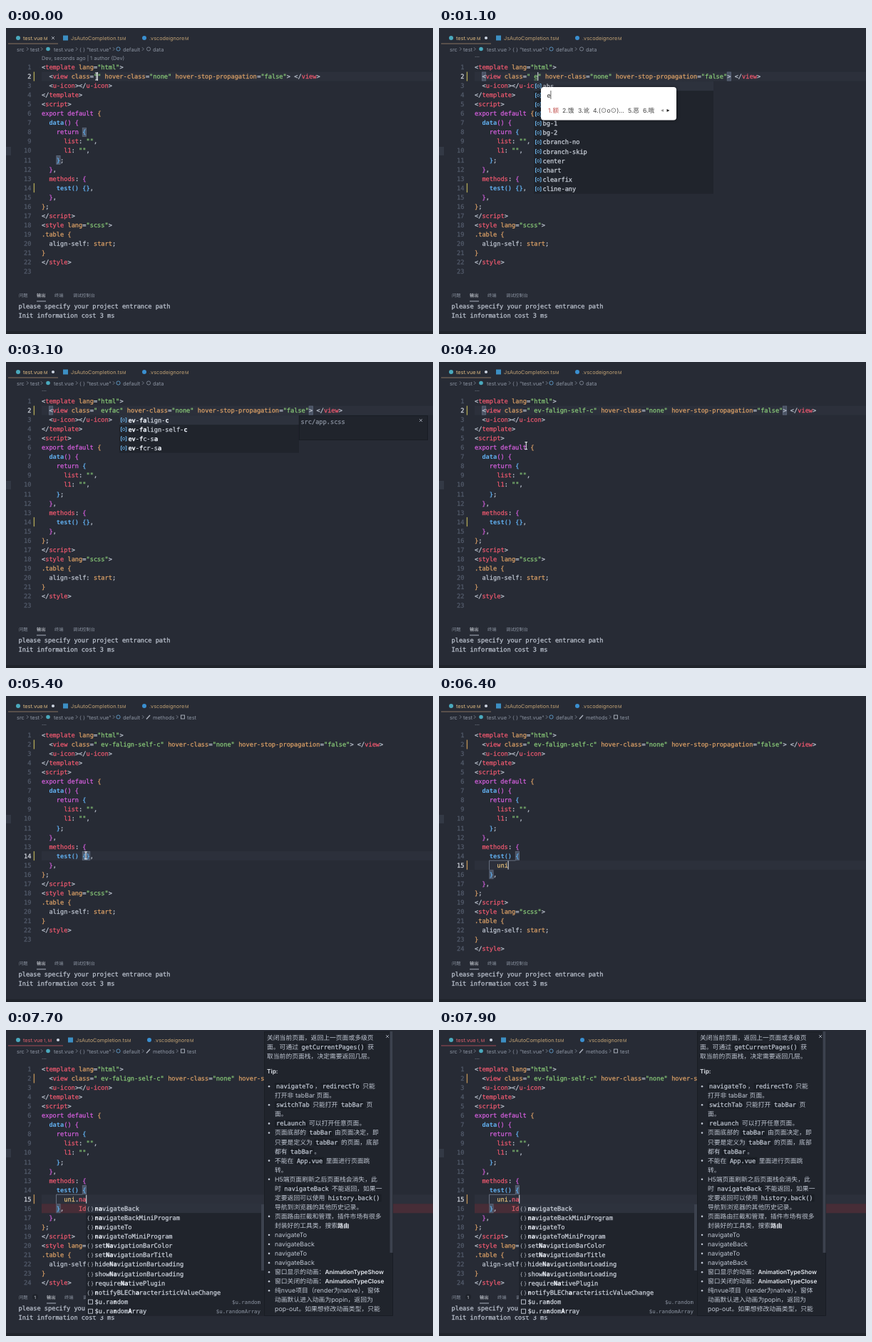
Animation of 599 by 430 pixels, one loop 8000 ms. Source, as an HTML page with a canvas:

```html
<!DOCTYPE html>
<html lang="en">
<head>
<meta charset="utf-8">
<title>Editor completion</title>
<style>
html, body { margin: 0; width: 100%; height: 100%; overflow: hidden; background: #272b35; }
canvas { display: block; width: 599px; height: 430px; }
</style>
</head>
<body>
<canvas id="stage"></canvas>
<script>
const W = 599, H = 430, LOOP = 8000;
const CELL = 5.21, LINE = 13.05, ROW = 13.15, LEFT = 50;
const MONO = '"DejaVu Sans Mono", "Noto Sans CJK SC", monospace';
const SANS = 'Inter, "Noto Sans CJK SC", sans-serif';
const CODE = `8.65px ${MONO}`, BOLD = `bold ${CODE}`;
const INK = { w: '#bfc6d2', r: '#ef596f', o: '#dba066', y: '#e5c07b', g: '#89ca78', p: '#d55fde', b: '#61afef' };
const BG = '#272b35', POPUP = '#20242c', SELECTED = '#2d323d', MUTED = '#8b93a1', BRIGHT = '#e3e7ee';

const canvas = document.getElementById('stage');
const ctx = canvas.getContext('2d');
const dpr = window.devicePixelRatio || 1;
canvas.width = W * dpr;
canvas.height = H * dpr;
ctx.scale(dpr, dpr);
ctx.textRendering = 'geometricPrecision';

// Timelines are lists of [start, value]
const CLASS_TEXT = [[0, ''], [500, ' '], [1000, ' e'], [1400, ' '], [1500, ' e'], [1700, ' ev'],
  [2400, ' evf'], [2500, ' evfa'], [2600, ' evfac'], [3600, ' ev-falign-self-c']];
const CALL_TEXT = [[0, null], [5700, ''], [6000, 'u'], [6100, 'un'], [6300, 'uni'], [6500, 'uni.'],
  [7300, 'uni.n'], [7600, 'uni.na']];
const EV_SELECTION = [[0, 0], [1800, 1], [1900, 2], [2000, 3], [2100, 4], [2200, 5], [2400, 0], [3300, 1]];
const CLICK = 4800, ERROR = 7200;

const BASE_ITEMS = ['abs', 'active', 'badge', 'bg-0', 'bg-1', 'bg-2', 'cbranch-no', 'cbranch-skip',
  'center', 'chart', 'clearfix', 'cline-any'];
const EV_ITEMS = ['ev-badge', ...[0, 1, 2, 3, 4, 5].map(n => 'ev-border-b-' + n),
  ...[0, 1, 2, 3, 4].map(n => 'ev-border-l-' + n)];
const EVF_ITEMS = ['ev-falign-c', 'ev-falign-self-c', 'ev-fc-sa', 'ev-fcr-sa'];
const UTIL_ITEMS = ['color', 'colorGradient', 'colorToRgba', 'debounce', 'deepClone', 'deepMerge',
  'getRect', 'guid', 'hexToRgb', 'os', 'queryParams', 'random'].map(s => '$u.' + s);
const NAV_ITEMS = ['navigateBack', 'navigateBackMiniProgram', 'navigateTo', 'navigateToMiniProgram',
  'setNavigationBarColor', 'setNavigationBarTitle', 'hideNavigationBarLoading',
  'showNavigationBarLoading', 'requireNativePlugin', 'notifyBLECharacteristicValueChange',
  '$u.random', '$u.randomArray'];

// `code`, *bold*, leading "-" starts a bullet, leading space continues one
const NAV_HELP = ['关闭当前页面，返回上一页面或多级页', '面。可通过 `getCurrentPages()` 获', '取当前的页面栈，决定需要返回几层。',
  '', '*Tip:*', '', '-`navigateTo`，`redirectTo` 只能', ' 打开非 tabBar 页面。', '-`switchTab` 只能打开 `tabBar` 页', ' 面。',
  '-`reLaunch` 可以打开任意页面。', '-页面底部的 `tabBar` 由页面决定，即', ' 只要是定义为 `tabBar` 的页面，底部', ' 都有 `tabBar`。',
  '-不能在 `App.vue` 里面进行页面跳', ' 转。', '-H5端页面刷新之后页面栈会消失，此', ' 时 `navigateBack` 不能返回，如果一',
  ' 定要返回可以使用 `history.back()`', ' 导航到浏览器的其他历史记录。', '-页面路由拦截和管理，插件市场有很多', ' 封装好的工具类，搜索*路由*',
  '-navigateTo', '-navigateBack', '-navigateTo', '-navigateBack', '-窗口显示的动画：*AnimationTypeShow*',
  '-窗口关闭的动画：*AnimationTypeClose*', '-纯nvue项目（render为native），窗体', ' 动画默认进入动画为popin，返回为',
  ' pop-out。如果想修改动画类型，只能'];

function stepAt(steps, t) {
  return steps.filter(([start]) => start <= t).pop();
}
const valueAt = (steps, t) => stepAt(steps, t)[1];
const lineY = n => 55 + (n - 1) * LINE;
const colX = c => LEFT + c * CELL;

function rect(x, y, w, h, color) {
  ctx.fillStyle = color;
  ctx.fillRect(x, y, w, h);
}
function text(s, x, y, color, font = CODE, align = 'left') {
  ctx.font = font;
  ctx.fillStyle = color;
  ctx.textAlign = align;
  ctx.fillText(s, x, y + 3);
  if (font !== CODE) return;
  // A hairline outline gives the code its medium weight
  ctx.strokeStyle = color;
  ctx.lineWidth = 0.25;
  ctx.strokeText(s, x, y + 3);
}
const label = (s, x, y, color = MUTED, size = 7.4) => text(s, x, y, color, `${size}px ${SANS}`);
function dot(x, y, r, color) {
  ctx.fillStyle = color;
  ctx.beginPath();
  ctx.arc(x, y, r, 0, 7);
  ctx.fill();
}
function stroke(color, width, ...points) {
  ctx.strokeStyle = color;
  ctx.lineWidth = width;
  ctx.beginPath();
  points.forEach(([x, y], i) => i ? ctx.lineTo(x, y) : ctx.moveTo(x, y));
  ctx.stroke();
}
function cross(x, y, color) {
  stroke(color, 0.8, [x - 2, y - 2], [x + 2, y + 2]);
  stroke(color, 0.8, [x + 2, y - 2], [x - 2, y + 2]);
}
function ring(x, y, r, color) {
  ctx.strokeStyle = color;
  ctx.lineWidth = 0.8;
  ctx.beginPath();
  ctx.arc(x, y, r, 0, 7);
  ctx.stroke();
}
function box(x, y, w, h, color) {
  ctx.strokeStyle = color;
  ctx.lineWidth = 0.9;
  ctx.strokeRect(x, y, w, h);
}

// Each segment starts with its colour key
function codeLines(cls, call) {
  const [object, member] = (call || '').split('.');
  const test = call === null ? ['b    test|b() {}|w,']
    : ['b    test|b() {', `y      ${object}|w${member === undefined ? '' : '.'}|r${member || ''}`, 'b    }|w,'];
  return ['w<|rtemplate|o lang|w=|g"html"|w>',
    `w  <|rview|o class|w=|g"${cls}"|o hover-class|w=|g"none"|o hover-stop-propagation|w=|g"false"|w> </|rview|w>`,
    'w  <|ru-icon|w></|ru-icon|w>', 'w</|rtemplate|w>', 'w<|rscript|w>', 'pexport default |o{',
    'b  data|p() {', 'p    return |b{', 'r      list|w: |g""|w,', 'r      l1|w: |g""|w,', 'b    }|w;',
    'p  }|w,', 'r  methods|w: |p{', ...test, 'p  }|w,', 'o}|w;', 'w</|rscript|w>',
    'w<|rstyle|o lang|w=|g"scss"|w>', 'o.table {', 'w  align-self: |ostart|w;', 'o}', 'w</|rstyle|w>'];
}
function drawCode(line, y) {
  let col = 0;
  for (const part of line.split('|')) {
    const s = part.slice(1), body = s.trimStart();
    const indent = s.length - body.length;
    text(body, colX(col + indent), y, INK[part[0]], part[0] === 'b' ? BOLD : CODE);
    col += s.length;
  }
}

function drawTab(name, status, x, statusX, color) {
  label(name, x, 14, color, 7.3);
  label(status, statusX, 13.8, color, 6);
}
function drawHeader(t) {
  const dirty = t >= 500, error = t >= ERROR, shift = error ? 7 : 0;
  const amber = '#dfba80', dim = '#c2a274', red = '#e0606c';
  dot(17, 14, 3, '#4aa9bd');
  drawTab('test.vue', error ? '1, M' : 'M', 24, 53, error ? red : amber);
  if (dirty) dot(66 + shift, 14, 2.1, '#cbd3df'); else cross(66, 14, '#c5cad3');
  rect(3, 21.5, 70 + shift, 1, error ? '#a24d56' : '#8a7560');
  rect(80 + shift, 10.5, 7, 7, '#3c8fc4');
  drawTab('JsAutoCompletion.ts', 'M', 91 + shift, 163 + shift, dim);
  dot(194 + shift, 14, 3, '#3a8fd0');
  drawTab('.vscodeignore', 'M', 201 + shift, 251 + shift, dim);

  const y = 29.5, chevron = x => stroke(MUTED, 0.8, [x - 1, y - 2.2], [x + 1.2, y], [x - 1, y + 2.2]);
  [30, 50, 99, 151, 192].forEach(chevron);
  label('src', 15, y);
  label('test', 34, y);
  dot(59, y, 2.8, '#4aa9bd');
  label('test.vue', 67, y);
  label('{ }', 103, y, MUTED, 7);
  label('"test.vue"', 113, y);
  ring(157.5, y, 2.6, '#6aaee0');
  label('default', 164, y);
  if (t < CLICK) {
    ring(200, y, 2.6, MUTED);
    label('data', 206, y);
  } else {
    chevron(240);
    stroke('#b0b6c2', 1.3, [197, y + 3], [202, y - 2.5]);
    label('methods', 206, y);
    box(245.5, y - 2.5, 5, 5, '#b0b6c2');
    label('test', 254, y);
  }
  if (dirty) label('…', 50, 38, MUTED, 8);
  else label('Dev, seconds ago | 1 author (Dev)', 50, 41.5, MUTED, 7.3);
}

function drawPanel(t) {
  const y = 375, shift = t >= ERROR ? 14 : 0;
  label('问题', 18, y, MUTED, 6.3);
  if (shift) {
    dot(41, y, 4, '#1f232b');
    label('1', 39.5, y - 0.5, BRIGHT, 6);
  }
  label('输出', 43 + shift, y, BRIGHT, 6.3);
  rect(43 + shift, 383.5, 13, 0.9, '#b9c0cd');
  label('终端', 68 + shift, y, MUTED, 6.3);
  label('调试控制台', 94 + shift, y, MUTED, 6.2);
  text('please specify your project entrance path', 17.5, 391, INK.w);
  text('Init information cost 3 ms', 17.5, 404, INK.w);
  rect(0, 426, W, 4, '#20242b');
  rect(0, 167, 7, 12, '#333945');
}

function drawIcon(kind, x, y) {
  if (kind === 'value') {
    const blue = '#6cb6ee';
    stroke(blue, 1, [x + 4, y - 3], [x + 2.5, y - 3], [x + 2.5, y + 3], [x + 4, y + 3]);
    stroke(blue, 1, [x + 8.5, y - 3], [x + 10, y - 3], [x + 10, y + 3], [x + 8.5, y + 3]);
    ring(x + 6.2, y, 1.7, blue);
  } else if (kind === 'snippet') {
    box(x + 3.5, y - 3, 6, 6, '#c3c9d4');
  } else {
    label('{ }', x + 2, y, '#c3c9d4', 7.6);
  }
}
function drawList(x, y, items, selected, match, kindOf) {
  rect(x, y, 252, items.length * ROW, POPUP);
  items.forEach((item, i) => {
    const mid = y + (i + 0.5) * ROW, kind = kindOf(item);
    if (i === selected) rect(x, y + i * ROW, 252, ROW, SELECTED);
    drawIcon(kind, x, mid);
    text(item, x + 12.5, mid, '#ccd2dc');
    if (kind === 'snippet') text(item, x + 245, mid, MUTED, `7.4px ${MONO}`, 'right');
    let found = 0;
    [...item].forEach((char, c) => {
      if (char.toLowerCase() !== match[found]) return;
      text(char, x + 12.5 + c * CELL, mid, BRIGHT, BOLD);
      found++;
    });
  });
}
function drawDetail(x, y, h, closeX, closeY) {
  rect(x, y, 181, h, POPUP);
  box(x + 0.5, y + 0.5, 180, h - 1, '#191d24');
  cross(closeX, closeY, '#b0b6c2');
}
const scrollbar = (x, y, h) => rect(x, y, 4, h, '#3c424e');

function richText(s, x, y) {
  for (const part of s.split(/(`[^`]+`|\*[^*]+\*)/).filter(Boolean)) {
    const code = part[0] === '`', bold = part[0] === '*';
    const body = code || bold ? part.slice(1, -1) : part;
    const font = code ? CODE : bold ? `600 8.3px ${SANS}` : `8.8px ${SANS}`;
    ctx.font = font;
    ctx.textAlign = 'left';
    const w = ctx.measureText(body).width;
    if (code) rect(x, y - 5, w + 4, 10.5, '#1a1e25');
    text(body, x + (code ? 2 : 0), y, bold ? BRIGHT : '#bfc6d2', font);
    x += w + (code ? 4 : 0);
  }
}
function drawNavHelp(x) {
  drawDetail(x, 2, 400, 535, 9);
  scrollbar(x + 176.5, 2, 311);
  let y = 11;
  for (const s of NAV_HELP) {
    const bullet = s[0] === '-';
    if (bullet) dot(x + 7, y, 1.3, '#bfc6d2');
    if (s) richText(bullet || s[0] === ' ' ? s.slice(1) : s, x + (bullet || s[0] === ' ' ? 15 : 4), y);
    y += s ? 13.05 : 8;
  }
}

function drawInputMethod() {
  ctx.save();
  ctx.shadowColor = 'rgba(0,0,0,.45)';
  ctx.shadowBlur = 5;
  ctx.fillStyle = '#fff';
  ctx.beginPath();
  ctx.roundRect(143, 83, 190, 46.5, 4);
  ctx.fill();
  ctx.restore();
  label('e', 151.5, 95, '#333', 9);
  rect(156.5, 88, 0.8, 12, '#444');
  label('1.', 153, 116, '#c0504d', 8.6);
  label('额', 159.5, 116, '#c0504d', 8.6);
  [['2.饿', 173], ['3.讹', 195], ['4.(⊙o⊙)…', 216], ['5.恶', 265], ['6.哦', 286]]
    .forEach(([s, x]) => label(s, x, 116, '#444', 8.6));
  label('◂', 311, 115, '#999', 8);
  label('▸', 319.5, 115, '#222', 8);
}

function drawPopups(t, cls, call) {
  const value = () => 'value';
  if (t >= 600 && t < 1500) {
    drawList(133, 75, BASE_ITEMS, 0, '', value);
    if (cls === ' e') drawInputMethod();
  } else if (t >= 1600 && t < 3600) {
    const x = colX(2 + 13 + cls.length) - 0.5;
    const items = t < 2400 ? EV_ITEMS : EVF_ITEMS;
    drawList(x, 75, items, valueAt(EV_SELECTION, t), cls.trim(), value);
    if (t >= 1800) {
      drawDetail(x + 252, 75, 35, x + 423, 82);
      text('src/app.scss', x + 254.5, 84, MUTED);
    }
  } else if (t >= 6500) {
    const x = colX(6 + call.length) - 0.5, typed = call.slice(4);
    const kindOf = s => s[0] === '$' ? 'snippet' : 'module';
    drawList(x, 244, typed ? NAV_ITEMS : UTIL_ITEMS, 0, typed, kindOf);
    if (typed) scrollbar(x + 246, 245, 93);
    if (t >= 7600) {
      drawNavHelp(x + 250);
    } else if (t >= 6600 && !typed) {
      drawDetail(x + 252, 244, 41, 525, 252);
      text('color 颜色值 (uniapp小程序扩展)', x + 254, 253, MUTED);
      rect(x + 252, 264, 181, 0.8, '#353b47');
      text('this.$u.color[]', x + 254, 274, '#ccd2dc');
    }
  }
}

function drawPointer(t) {
  if (t >= 500 && t < 3900 || t >= 5700) return;
  const p = Math.min(1, Math.max(0, (t - 3900) / 800)), ease = p * p * (3 - 2 * p);
  const x = 127 - 15 * ease, y = 68 + 156 * ease;
  stroke('#f2f4f7', 1, [x, y - 5], [x, y + 5]);
  for (const end of [-5, 5]) stroke('#f2f4f7', 1, [x - 1.8, y + end], [x + 1.8, y + end]);
}

function draw(t) {
  const cls = valueAt(CLASS_TEXT, t), call = valueAt(CALL_TEXT, t);
  const split = call !== null;
  const cursorLine = t < CLICK ? 2 : split ? 15 : 14;
  const cursorCol = t < CLICK ? 15 + cls.length : split ? 6 + call.length : 12;
  const brackets = t < 200 ? [[8, 11], [11, 4]]
    : t < CLICK ? [[2, 2], [2, 66 + cls.length]]
    : split ? [[14, 11], [16, 4]] : [[14, 11], [14, 12]];

  rect(0, 0, W, H, BG);
  drawHeader(t);
  rect(LEFT, lineY(cursorLine) - 6.5, W - LEFT, LINE, '#2c303b');
  if (t >= ERROR) {
    rect(LEFT, lineY(16) - 6.5, W - LEFT, LINE, '#472d37');
    text('Identifier expected.', 102, lineY(16), '#d9616c');
  }
  for (const [line, col] of brackets) {
    rect(colX(col), lineY(line) - 6, CELL, 12, '#4a5364');
    box(colX(col), lineY(line) - 6, CELL, 12, '#5c677a');
  }
  for (const line of [2, split ? 15 : 14]) rect(38.7, lineY(line) - 6.5, 1.4, LINE, split ? '#b58d55' : '#a9a055');
  if (split) {
    const top = lineY(15) - 6.5;
    stroke('#6f7988', 0.9, [colX(11), top], [colX(4) - 0.3, top], [colX(4) - 0.3, top + LINE]);
  }

  const lines = codeLines(cls, call);
  const count = split ? 24 : 23;
  for (let n = 1; n <= count; n++) {
    text(n, 35.5, lineY(n), n === cursorLine ? '#d0d4dc' : '#535b6b', CODE, 'right');
    if (lines[n - 1]) drawCode(lines[n - 1], lineY(n));
  }
  if (t >= 1000 && t < 1400) rect(colX(16), lineY(2) + 4.5, CELL, 0.8, INK.g);
  drawPanel(t);

  const lastEdit = Math.max(stepAt(CLASS_TEXT, t)[0], stepAt(CALL_TEXT, t)[0], t >= CLICK ? CLICK : 0);
  if ((t - lastEdit) % 1000 < 500) rect(colX(cursorCol) - 0.3, lineY(cursorLine) - 6, 1, 12, '#e3e7ee');
  drawPopups(t, cls, call);
  drawPointer(t);
}

function frame(now) {
  draw(now % LOOP);
  requestAnimationFrame(frame);
}
frame(performance.now());
</script>
</body>
</html>
```
